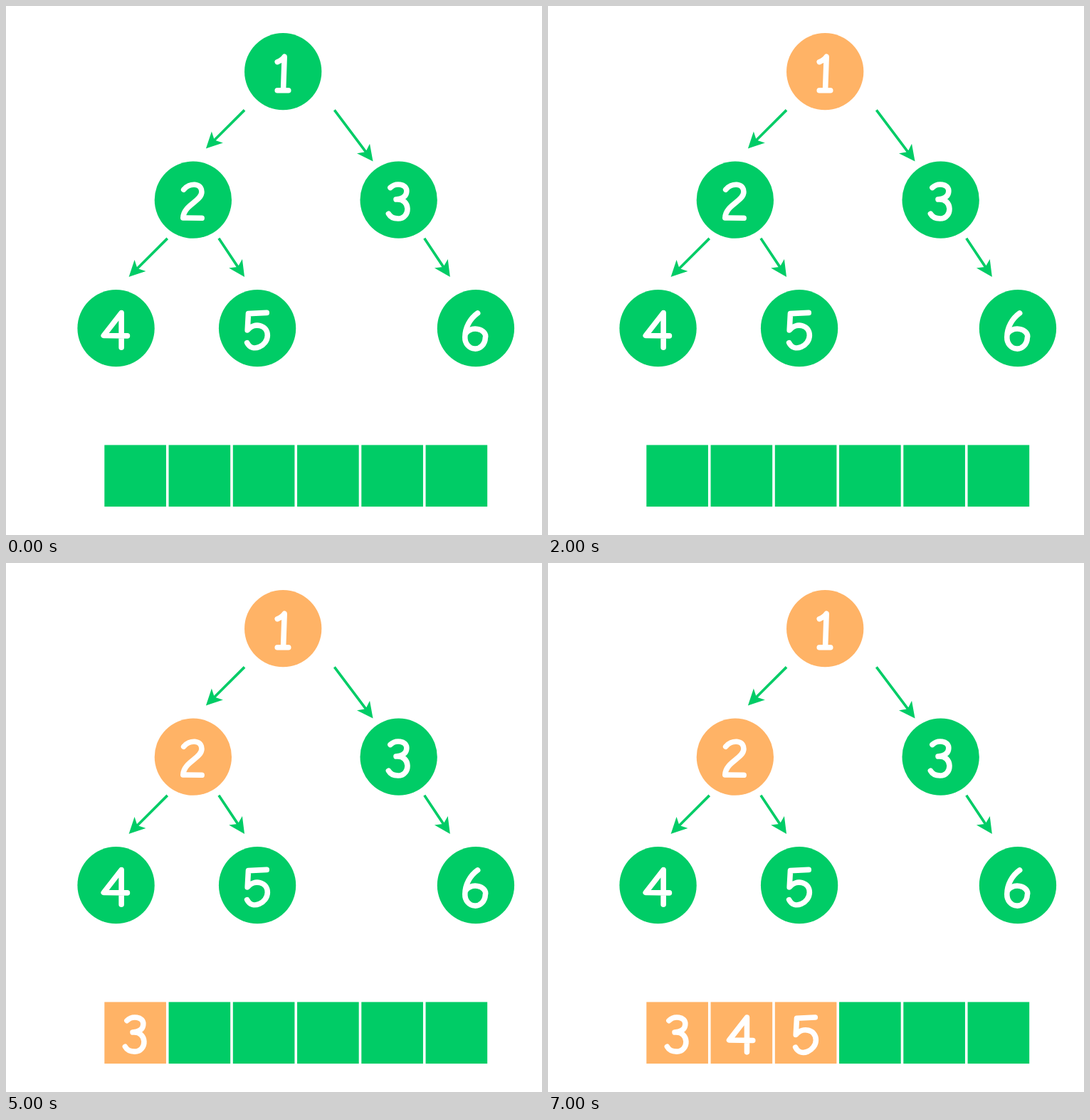
An HTML page that plays this animation: 753 px wide and 744 px high, repeating every 8000 ms.

```html
<!DOCTYPE html>
<html lang="en">
<head>
<meta charset="utf-8">
<title>Breadth-first traversal</title>
<style>
  html, body { margin: 0; width: 100%; height: 100%; overflow: hidden; background: #fff; }
  svg { display: block; }
  .digit { fill: none; stroke: #fff; stroke-width: 4.2; stroke-linecap: round; stroke-linejoin: round; }
  .arrow { fill: #00cc66; stroke: #00cc66; stroke-width: 2; }
</style>
</head>
<body>
<svg id="stage" width="753" height="744"></svg>
<script>
const GREEN = '#00cc66', ORANGE = '#ffb366';
const STEP_MS = 1000, STEP_COUNT = 8, NODE_COUNT = 6;
const SCALE = 1.805, ROOT_X = 389.2, ROOT_Y = 92.2; // pixels per unit, root position in pixels

// Handwritten digits 1 to 6, centred on the origin
const DIGITS = [
  'M-4.4-7.5Q-.6-9 1.1-11.6L.2 14.5M-4.4 14.7H4.2',
  'M-7.3-8C-3-13.5 6.7-13.5 6.7-6.2S-7.6 4-7.8 14L6.8 14.2',
  'M-6.5-9.5C-2.5-13.5 6.2-12.7 6.2-7S.5-.7-2-.4C9.5-1.5 9.5 14.6-.5 14.6Q-5.8 14.6-7.9 10.8',
  'M4.2 15V-12L-9.6 5.7L8.8 5.9',
  'M7.3-12.1L-7-11.4L-7.7 1.5C-2.5-5 7.9-2.6 7.9 5.6S-4 19.5-8 11.3',
  'M1.5-11.8C-4.5-7.5-8.4-.5-8.4 7A7.9 8.7 0 0 0 7.4 7.6A8 5.8 0 0 0-8.2 5'
];

// Nodes are numbered like a heap: the parent of n is n >> 1.
// dx is the offset from the parent, tail and tip place the arrow below it.
const LINKS = {
  2: { dx: -70, tail: -30, tip: -60, drop: 60 },
  3: { dx: 90, tail: 40, tip: 70, drop: 70 },
  4: { dx: -60, tail: -20, tip: -50, drop: 60 },
  5: { dx: 50, tail: 20, tip: 40, drop: 60 },
  6: { dx: 60, tail: 20, tip: 40, drop: 60 }
};

const stage = document.getElementById('stage');
stage.setAttribute('viewBox', [-ROOT_X, -ROOT_Y, 753, 744].map(v => v / SCALE).join(' '));

function add(tag, attrs) {
  const el = document.createElementNS('http://www.w3.org/2000/svg', tag);
  for (const name in attrs) el.setAttribute(name, attrs[name]);
  return stage.appendChild(el);
}

function addDigit(x, y, value) {
  return add('path', { class: 'digit', transform: `translate(${x} ${y})`, d: DIGITS[value - 1] || '' });
}

function addArrow(x1, y1, x2, y2) {
  const angle = Math.atan2(y2 - y1, x2 - x1) * 180 / Math.PI;
  const length = Math.hypot(x2 - x1, y2 - y1);
  add('path', {
    class: 'arrow',
    transform: `translate(${x2} ${y2}) rotate(${angle}) translate(-2.24 0)`,
    d: `M${2.24 - length} 0H-6M0 0L-8-4L-6 0L-8 4Z`
  });
}

const nodes = [], cells = [];
for (let n = 1; n <= NODE_COUNT; n++) {
  const parent = nodes[n >> 1], link = LINKS[n];
  const x = parent ? parent.x + link.dx : 0;
  const y = parent ? parent.y + 100 : 0;
  if (parent) addArrow(parent.x + link.tail, parent.y + 30, parent.x + link.tip, parent.y + link.drop);
  nodes[n] = { x, y, shape: add('circle', { cx: x, cy: y, r: 30 }) };
  addDigit(x, y, n);

  const cellX = 50 * n - 165, cellY = 315;
  cells.push({
    shape: add('rect', { x: cellX - 24, y: cellY - 24, width: 48, height: 48 }),
    digit: addDigit(cellX, cellY)
  });
}

// Record the state after every enqueue and dequeue
function traverse() {
  const steps = [], queue = [];
  let visited = 0;
  const record = () => steps.push({ visited, queue: [...queue] });
  const enqueue = n => { queue.push(n); record(); };
  record();
  enqueue(1);
  while (queue.length) {
    const node = visited = queue.shift();
    record();
    for (const child of [2 * node, 2 * node + 1]) if (nodes[child]) enqueue(child);
  }
  return steps.slice(0, STEP_COUNT);
}

function show({ visited, queue }) {
  const paint = (shape, active) => shape.setAttribute('fill', active ? ORANGE : GREEN);
  nodes.forEach(({ shape }, n) => paint(shape, n <= visited));
  cells.forEach(({ shape, digit }, i) => {
    paint(shape, i < queue.length);
    digit.setAttribute('d', DIGITS[queue[i] - 1] || '');
  });
}

const steps = traverse();
const start = performance.now();
function frame() {
  const elapsed = performance.now() - start;
  show(steps[Math.floor(elapsed / STEP_MS) % STEP_COUNT]);
  requestAnimationFrame(frame);
}
frame();
</script>
</body>
</html>
```
